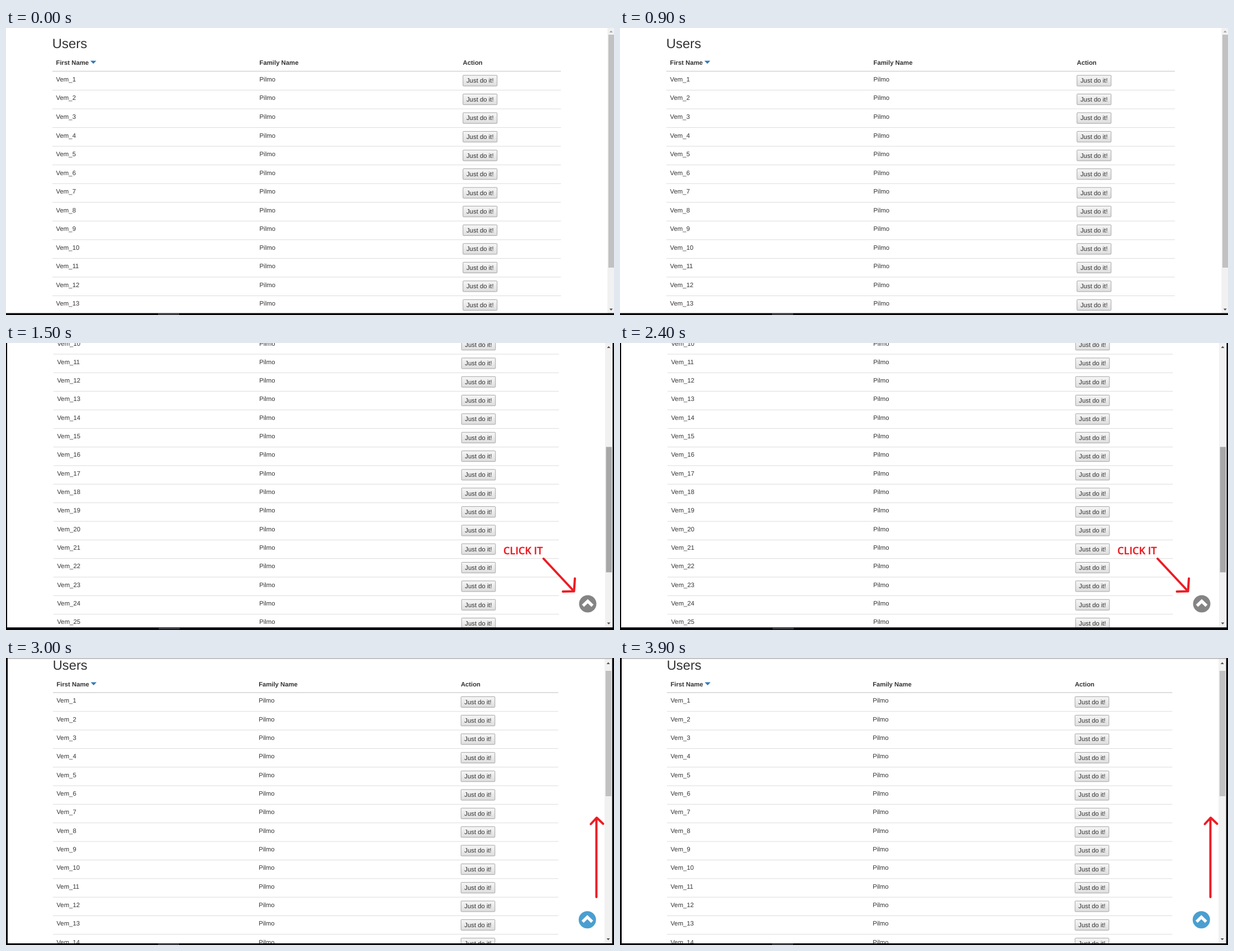
An HTML page that plays this animation: 1088 px wide and 515 px high, repeating every 4.5 s.

```html
<!DOCTYPE html>
<html lang="en">
<head>
<meta charset="utf-8">
<title>Users table with scroll-to-top button</title>
<style>
  html, body { margin: 0; width: 100%; height: 100%; overflow: hidden; background: #fff; }
  svg { display: block; width: 1088px; height: 515px; }
  text { font-family: "Liberation Sans", Arial, sans-serif; fill: #333; white-space: pre; text-rendering: geometricPrecision; }
  .head { font-weight: bold; }
  .note { font: 600 18.2px "Open Sans", sans-serif; fill: #ed1c24; stroke: #ed1c24; stroke-width: .4; }
  .arrow { fill: none; stroke: #ed1c24; stroke-width: 4; stroke-linecap: round; stroke-linejoin: round; }
  .chevron { fill: none; stroke: #fff; stroke-width: 5.4; }
</style>
</head>
<body>
<svg id="stage" viewBox="0 0 1088 515">
  <defs>
    <linearGradient id="face" x2="0" y2="1">
      <stop stop-color="#f6f6f6"/><stop offset="1" stop-color="#dedede"/>
    </linearGradient>
  </defs>
</svg>
<script>
const HOLD = 1500, ROWS = 25, ROW_HEIGHT = 33.54, HEADER_BOTTOM = 77.5;
const COLUMNS = [6.5, 370.5, 734.5];

const rect = (x, y, w, h, fill, extra = '') =>
  `<rect x="${x}" y="${y}" width="${w}" height="${h}" fill="${fill}" ${extra}/>`;
const path = (d, attrs) => `<path d="${d}" ${attrs}/>`;

function table({ left, scroll, scale }) {
  const px = x => left + x * scale;
  const py = y => y * scale - scroll;
  const label = (x, y, size, content, attrs = '') =>
    `<text x="${px(x)}" y="${py(y)}" font-size="${size * scale}" ${attrs}>${content}</text>`;
  const rule = (y, color, h = 1) => rect(left, py(y), 910 * scale, h, color);

  let out = label(-.3, 36, 23.9, 'Users');
  ['First Name', 'Family Name', 'Action'].forEach((title, i) => {
    out += label(COLUMNS[i], 66.2, 11.35, title, 'class="head"');
  });
  out += path(`M${px(68)} ${py(58.8)}h10.5l-5.25 5.5z`, 'fill="#337ab7"');
  out += rule(HEADER_BOTTOM - .7, '#d6d6d6', 1.6);

  for (let i = 1; i <= ROWS; i++) {
    const top = HEADER_BOTTOM + (i - 1) * ROW_HEIGHT;
    out += label(COLUMNS[0], top + 18.4, 11.4, 'Vem_' + i);
    out += label(COLUMNS[1], top + 18.4, 11.4, 'Pilmo');
    out += rect(px(COLUMNS[2] + .3), py(top + 7.4), 61 * scale, 19.2 * scale,
      'url(#face)', 'rx="1" stroke="#a3a3a3"');
    out += label(COLUMNS[2] + 30.8, top + 20.9, 11.4, 'Just do it!', 'text-anchor="middle"');
    out += rule(top + ROW_HEIGHT, '#dcdcdc');
  }
  return out;
}

function browser({ bar, thumb, thumbColor, arrows, edges, bottom, task }) {
  const [up, down] = arrows, mid = bar + 6.5;
  return rect(bar, 0, 1088 - bar, 515, '#f1f1f1')
    + rect(bar + 1.7, thumb[0], 10.3, thumb[1] - thumb[0], thumbColor)
    + path(`M${mid - 3} ${up + 2}h6l-3 -3.5z`, `fill="${bar > 1075 ? '#a3a3a3' : '#505050'}"`)
    + path(`M${mid - 3} ${down - 1.5}h6l-3 3.5z`, 'fill="#505050"')
    + rect(0, 0, edges[0], 515, '#000')
    + rect(1088 - edges[1], 0, edges[1], 515, '#000')
    + rect(0, bottom, 1088, 515 - bottom, '#050509')
    + rect(task, bottom + .5, 38, 3, '#3a3a3f');
}

const topButton = (x, y, color) =>
  `<circle cx="${x}" cy="${y}" r="15.5" fill="${color}"/>`
  + path(`M${x - 8.5} ${y + 3.5}l8.5 -8.3l8.5 8.3`, 'class="chevron"');
const arrow = d => path(d, 'class="arrow"');

const scenes = [
  table({ left: 83, scroll: 0, scale: 1 })
    + browser({ bar: 1076.3, thumb: [12, 430], thumbColor: '#c1c1c1', arrows: [6, 505],
                edges: [0, 0], bottom: 511.6, task: 272 }),

  table({ left: 85, scroll: 390.8, scale: .9938 })
    + browser({ bar: 1072, thumb: [186.5, 411.5], thumbColor: '#a8a8a8', arrows: [7, 503],
                edges: [2, 2.5], bottom: 510.3, task: 273 })
    + '<text class="note" x="890" y="378.5">CLICK IT</text>'
    + arrow('M962 387L1016 445M996.5 446L1016.5 445.5L1018 422.5')
    + topButton(1041, 468, '#848484'),

  table({ left: 84, scroll: 15, scale: .9938 })
    + browser({ bar: 1071.2, thumb: [23, 248], thumbColor: '#c1c1c1', arrows: [9, 504.5],
                edges: [3, 3.3], bottom: 512, task: 272 })
    + rect(3, 0, 1081.7, 1.6, '#b4b4b4')
    + arrow('M1056.5 429V287M1046.5 298L1057 286.5L1068.5 297.5')
    + topButton(1040.3, 469.7, '#4a9fd0')
];

const stage = document.getElementById('stage');
stage.insertAdjacentHTML('beforeend', scenes.map(s => `<g display="none">${s}</g>`).join(''));
const groups = stage.querySelectorAll(':scope > g');

const start = performance.now();
function draw() {
  const current = Math.floor((performance.now() - start) / HOLD) % groups.length;
  groups.forEach((g, i) => g.setAttribute('display', i === current ? 'inline' : 'none'));
  requestAnimationFrame(draw);
}
draw();
</script>
</body>
</html>
```
